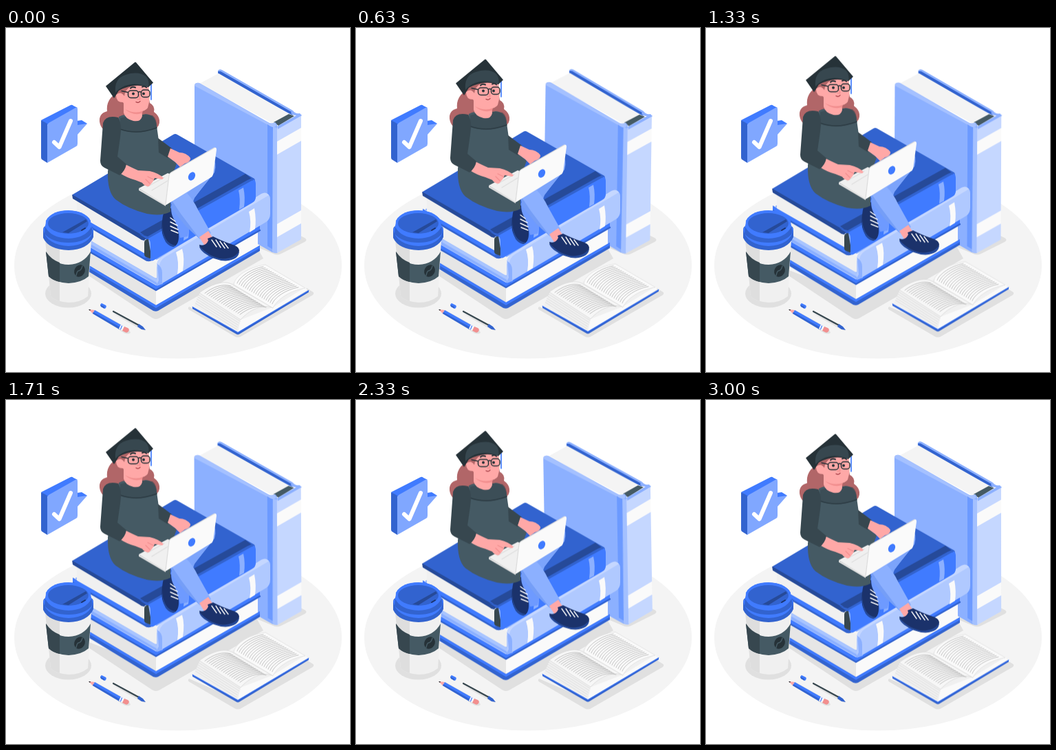
An HTML page for the animation above (3.04 s loop, 500x500 px).

```html
<!DOCTYPE html>
<html lang="en">
<head>
<meta charset="utf-8">
<title>Studying on a stack of books</title>
<style>
  html, body { margin: 0; width: 100%; height: 100%; overflow: hidden; background: #fff; }
  svg { display: block; width: 100vw; height: 100vh; }
  .float, .sway, .drift { animation: 3040ms linear infinite; }
  .float { animation-name: float; }
  .sway { animation-name: sway; transform-origin: 351px 194px; }
  .drift { animation-name: drift; }
  @keyframes float { 50% { transform: translateY(-10px); } }
  @keyframes sway {
    25% { transform: rotate(1deg); }
    75% { transform: rotate(-1deg); }
  }
  @keyframes drift {
    0% { transform: none; }
    16.4% { transform: translateY(-.6px); }
    69% { transform: translateY(-8px); }
    100% { transform: translateY(-3.3px); }
  }
  .blue { fill: #407bff; }
  .mid { fill: #3263cf; }
  .deep { fill: #264a99; }
  .soft { fill: #8cb0ff; }
  .pale { fill: #c5d7ff; }
  .white { fill: #fafafa; }
  .paper { fill: #f0f0f0; }
  .shade { fill: #e0e0e0; }
  .slate { fill: #455a64; }
  .coal { fill: #37474f; }
  .ink { fill: #263238; }
  .skin { fill: #ffa8a7; }
  .hair { fill: #b16668; }
  .navy { fill: #1b326b; }
  .line { fill: none; stroke-linecap: round; stroke-linejoin: round; }
</style>
</head>
<body>
<svg viewBox="0 0 500 500">
  <ellipse cx="250" cy="345" rx="238" ry="135.500" fill="#f4f4f4"/>

  <!-- ground shadows -->
  <g class="shade">
    <path d="M90 340L212 421Q218 425 224 421L374 335L360 310L218 390Z"/>
    <path d="M364 318L388 328Q394 331 400 328L434 311Q439 308 434 305L420 298Z"/>
    <path d="M266 405Q263 408 267 410L332 448Q337 451 342 448L446 388Q449 385 445 383L437 378L337 436Z"/>
    <ellipse cx="90.500" cy="386" rx="33.500" ry="20.500"/>
    <path d="M124 414L168 441Q176 447 181 443L178 437L130 410Z"/>
    <path d="M154 414L196 438L203 440L196 433Z"/>
  </g>

  <!-- standing book -->
  <g class="sway">
    <path class="soft" d="M308 67V62Q310 59 314 61L417 120L414 126L309 70Z"/>
    <path class="mid" d="M308 63L312 63L415 122L417 127L309 69Z"/>
    <path fill="#f4f4f4" d="M281 81L309 66L414 126L392 141Z"/>
    <path class="slate" d="M389 137L411 125L419 128L396 142Z"/>
    <path class="soft" d="M274 84Q274 79 281 80L381 137Q386 140 391 137L394 140L395 327L387 326L366 314L274 261Z"/>
    <path d="M274 84Q275 79 281 80L380 137Q386 141 391 137L393 142L388 145L381 141Z" fill="#a5c1ff"/>
    <path d="M380 140Q385 144 388 144V322L380 317Z" fill="#6c9aff"/>
    <path class="pale" d="M394 146L428 126Q430 125 429 130V306Q429 308 426 309L394 327Z"/>
    <path d="M388 144Q394 144 394 147V327Q390 328 387 325Z" fill="#a3c0ff"/>
    <path class="soft" d="M394 143L422 127Q415 127 414 123L417 120Q420 125 427 124L430 127L395 147Z"/>
    <path class="white" d="M394 165L429 145V164L394 184ZM394 285L429 265V284L394 304Z"/>
  </g>

  <g class="float">
    <!-- bottom book -->
    <path class="blue" d="M97 304L218 374L369 287V295L218 382L97 312Z"/>
    <path d="M100 314L218 382V404L100 336Z" fill="#e6e6e6"/>
    <path class="white" d="M218 382L366 297V318L218 404Z"/>
    <path class="mid" d="M97 331L218 403L369 316V324L221 411Q218 412.500 214 411L97 340Z"/>
    <path class="blue" d="M97 331L218 403L369 316V320L218 407L97 335Z"/>
    <path class="line" d="M97 311L218 381L369 294" stroke="#3263cf" stroke-width="2.500"/>

    <!-- middle book -->
    <path class="soft" d="M100 268L219 337L370 250L250 190Z"/>
    <path class="paper" d="M103 276L222 343V366L103 299Z"/>
    <path class="soft" d="M97 294L216 363Q221 365 222 360L228 372L219 374L97 304Z"/>
    <path d="M97 294L216 363L222 367L219 370L97 299Z" fill="#a9c5ff"/>
    <path d="M219 348Q218 338 226 333L372 241Q383 238 384 248V270Q384 278 378 282L229 370Q219 376 219 374Z" fill="#b0c9ff"/>
    <path class="pale" d="M219 346Q219 337 227 332L371 241Q378 237 382 243L231 333Q223 338 222 350Z"/>
    <path class="soft" d="M220 343Q227 347 227 356V371Q221 375 218 374L222 367Z"/>
    <path class="white" d="M247 326L256 321Q260 334 257 353L249 358Q252 340 247 326ZM353 267L361 262Q364 278 362 292L354 297Q357 281 353 267Z"/>

    <!-- top book -->
    <path class="mid" d="M97 267L103 271L206 331L212 338Q206 341 201 337L97 276Z"/>
    <path class="blue" d="M97 267L204 329L207 333L201 334L97 273Z"/>
    <path class="paper" d="M103 247L203 303V328L103 271Z"/>
    <path class="mid" d="M97 242L243 155Q246 153 249 155L361 219Q363 222 360 225L210 307Q203 309 197 304L97 246Z"/>
    <path class="deep" d="M96 242L196 300Q202 303 208 300L201 309Q197 309 194 306L97 248Z"/>
    <path class="deep" d="M195 297L348 212L357 219L206 305Z"/>
    <path class="coal" d="M201 312Q201 307 207 307L212 336L204 333Q201 332 201 329Z"/>
    <path class="blue" d="M205 305L357 219Q363 220 363 226V246Q363 251 358 254L214 338Q209 340 210 332V314Q210 308 205 305Z"/>
    <path class="mid" d="M194 300L205 307L357 222Q362 221 358 218L351 221L206 303Z"/>
    <path class="soft" d="M338 236L345 232Q348 245 346 260L339 264Q341 248 338 236ZM257 282L264 278Q267 290 265 305L258 309Q260 295 257 282Z"/>

    <!-- legs -->
    <path d="M240 258L260 258L268 284L264 303L253 305Q250 286 238 272Z" fill="#6e9aff"/>
    <path class="soft" d="M236 240L300 186Q307 196 303 210L272 249L266 262Z"/>
    <path d="M262 241L302 209L274 247L270 258Z" fill="#7ca4fb"/>
    <path class="soft" d="M236 244L262 239Q272 249 279 264L298 298Q292 306 282 307L255 277Q244 262 236 244Z"/>
    <path d="M238 246L242 264L262 289L282 307L254 270Z" fill="#759ef7"/>
    <path class="skin" d="M281 304L294 295L303 309L289 317Z"/>

    <!-- shoes -->
    <path class="navy" d="M230 264L240 262Q240 270 243 276Q249 287 251 299Q252 316 243 318Q231 314 227 298Q225 284 230 264Z"/>
    <path class="deep" d="M227 284Q227 296 232 306Q237 315 247 316Q240 321 232 311Q226 299 227 284Z"/>
    <path class="line" d="M239 276L246 281M239 282L249 287M239 288L250 293M240 294L250 298" stroke="#fafafa" stroke-width="1.500"/>
    <path class="navy" d="M281 315Q290 318 294 309L293 306L301 303Q315 310 327 314Q338 317 339 323Q337 337 318 338Q304 337 290 327Q281 321 281 315Z"/>
    <path class="deep" d="M281 317Q297 334 315 335.500Q333 335 339 324Q339 337 319 338.500Q303 338 288 327Q281 321 281 317Z"/>
    <path class="line" d="M299 308L306 318M305 308L312 319M311 310L318 320M317 312L323 320" stroke="#fafafa" stroke-width="1.400"/>

    <!-- hair and body -->
    <path class="hair" d="M162 94Q145 103 147 121Q135 124 136 136Q138 150 151 150L216 147Q224 143 223 134Q222 127 215 122Q217 113 209 109L205 86Z"/>
    <path class="slate" d="M164 129Q174 123 184 129L203 125Q217 126 219 142L223 171L236 187L248 197L239 222L239 267Q226 274 205 270Q177 263 159 249Q147 238 148 208Z"/>
    <path class="coal" d="M166 131Q190 124 213 127Q220 132 219 146L200 151Q177 153 166 146Z" fill-opacity=".6"/>
    <path class="line" d="M166 147Q190 156 219 145" stroke="#2c3b43" stroke-width="1.500"/>
    <path class="coal" d="M221 160L241 175Q241 183 235 189L222 181Z"/>
    <path class="skin" d="M239 175L252 181Q262 181 268 189Q269 194 260 197L253 202L246 195L235 187Z"/>

    <!-- head -->
    <path class="skin" d="M171 108L197 112L198 128Q196 137 185 135Q173 132 171 123Z"/>
    <path d="M173 118Q188 126 199 120L198 124Q184 128 173 118Z" fill="#f28f8f"/>
    <path class="skin" d="M165 91Q178 76 207 84Q211 101 206 116Q201 123 189 121Q175 119 170 108Q160 108 160 98Q160 91 165 91Z"/>
    <path class="hair" d="M160 97Q158 82 178 77Q198 76 208 84Q191 82 180 86Q173 90 172 99Q167 91 160 97Z"/>
    <g transform="translate(0 -1.500)">
      <path class="line" d="M181 89Q184 86 188 88M198 87Q202 85 204 88" stroke="#263238" stroke-width="2"/>
      <path class="line" d="M193 98L195 105L191 105" stroke="#f28f8f" stroke-width="1.300"/>
      <path class="line" d="M189 109Q193 111 195 108" stroke="#a33b44" stroke-width="1.300"/>
      <g class="line" stroke="#263238" stroke-width="1.500">
        <rect x="177.500" y="92.500" width="15" height="10.500" rx="4"/>
        <rect x="196.500" y="91.500" width="12.500" height="10.500" rx="4"/>
        <path d="M192.500 95Q194 93 196.500 95M177 95L168 93"/>
      </g>
      <circle class="ink" cx="185" cy="97" r="2"/>
      <circle class="ink" cx="200" cy="97" r="2"/>
    </g>
    <path class="line" d="M211 80V104" stroke="#407bff" stroke-width="1.700"/>
    <path class="ink" d="M145 84.500L187 50Q188 49 189 50L214 79.500L207 86Q185 79 164 91L157 102Z"/>
    <path class="coal" d="M159 94Q157 73 174 68Q193 62 204 71Q209 77 207 86Q188 78 173 84Q164 88 159 94Z"/>

    <!-- laptop -->
    <path class="shade" d="M193 233L232 256V259L193 236Z"/>
    <path class="paper" d="M193 233L235 211L243 214L232 257Z"/>
    <path class="line" d="M205 231L230 217M212 236L235 222" stroke="#dedede" stroke-width="1.200"/>
    <path class="white" d="M240 210L303 174Q306 173 306 177L301 213Q300 216 298 217L233 257Q231 258 232 253L237 214Q238 211 240 210Z"/>
    <path class="line" d="M232 256L237 214Q238 211 240 210L303 174" stroke="#dcdcdc" stroke-width="1.200"/>
    <ellipse class="blue" cx="270" cy="215.500" rx="4.700" ry="6.500" transform="rotate(28 270 215.500)"/>

    <!-- near arm -->
    <path class="skin" d="M171 197Q183 203 192 207L209 208Q222 211 229 218L227 220L216 218Q215 221 213 224L208 230Q202 231 198 225L188 221Q176 218 164 210Z"/>
    <path class="line" d="M206 216L214 220M203 220L209 226" stroke="#f28f8f" stroke-width="1.200"/>
    <path class="coal" d="M141 138Q145 126 163 130Q169 140 166 159L162 187L175 198Q173 208 165 214L143 203Q137 200 137 193Z"/>
  </g>

  <!-- speech bubble -->
  <path fill="#80a7ff" d="M103 136L118 139L103 156Z"/>
  <path class="blue" d="M103 135L110 134L118 139L104 141Z"/>
  <path class="blue" d="M51 134L94 112Q96 111 98 113L104 116L60 141Z"/>
  <path class="mid" d="M51 134L60 139V196L52 191Q51 190 51 188Z"/>
  <path fill="#80a7ff" d="M60 142Q60 140 62 138L101 116Q104 115 104 118V168Q104 171 102 172L60 196Z"/>
  <path class="line" d="M70 166L77.500 173L94 135" stroke="#fff" stroke-width="6"/>

  <!-- coffee cup -->
  <path class="paper" d="M57 308H124L119 390Q108 399 91 399Q73 398 65 390Z"/>
  <path d="M57 308H78V397Q70 395 65 390Z" fill="#dedede"/>
  <path class="slate" d="M58 325Q69 344 91 344Q113 343 123 325L120 361Q110 370 91 371Q72 370 62 361Z"/>
  <path class="coal" d="M58 325Q65 336 78 341V369Q68 367 62 361Z"/>
  <ellipse class="ink" cx="107" cy="353" rx="7.500" ry="9" transform="rotate(32 107 353)"/>
  <path class="line" d="M111 346Q109 353 105 353Q103 354 102 360" stroke="#455a64" stroke-width="1.500"/>
  <path class="mid" d="M54 294Q54 288 58 288H123Q127 288 127 294V304Q119 322 91 323Q62 322 54 305Z"/>
  <path class="blue" d="M54 293Q58 288 58 280Q67 265 91 265Q115 266 123 280Q123 288 127 293Q123 315 91 317Q59 315 54 293Z"/>
  <path class="mid" d="M57 289Q65 305 91 306Q116 305 124 289Q127 296 124 300Q113 312 91 312Q67 312 56 299Z"/>
  <ellipse class="blue" cx="90.500" cy="283" rx="32.500" ry="17.500"/>
  <ellipse class="mid" cx="90.500" cy="284" rx="29.500" ry="15"/>
  <path class="deep" d="M82 297L116 278L118 281L91 298Z"/>
  <path class="line" d="M110 294L115 291" stroke="#1b326b" stroke-width="2"/>

  <!-- pencil, eraser, pen -->
  <path class="skin" d="M120 409L129 410L126 415Z"/>
  <path class="ink" d="M120 409L123 409L122 411Z"/>
  <path class="blue" d="M129 410L168 432L165 438L126 415Z"/>
  <path class="mid" d="M127 413L166 435L165 438L126 415Z"/>
  <path class="white" d="M167 431L172 434L169 440L164 437Z"/>
  <path class="line" d="M168.500 433L166.500 438" stroke="#407bff" stroke-width="1.200"/>
  <path d="M172 434L177 436Q180 438 178 441Q176 444 173 442L169 440Z" fill="#f28f8f"/>
  <path class="blue" d="M139 400L145 403Q147 405 144 408L138 405Q136 402 139 400Z"/>
  <path class="mid" d="M137 402L143 405L143 408L138 405Z"/>
  <path class="line" d="M156 412L193 432" stroke="#37474f" stroke-width="2.200"/>
  <path class="mid" d="M193 430L199 434L203 439L197 438L191 434Z"/>

  <!-- open book -->
  <g class="drift">
    <path class="mid" d="M271 405L337 442L440 381V384L339 445Q337 446 335 445L271 408Z"/>
    <path class="paper" d="M273 405L282 384L331 370L377 344L438 380L337 442Z"/>
    <path class="white" d="M337 442L341 424L388 406L435 377L438 381Z"/>
    <path class="line" d="M271 405.500L337 442.500L440 381.500" stroke="#407bff" stroke-width="1"/>
    <g id="edges" class="line" stroke="#dcdcdc" stroke-width=".8"></g>
    <path fill="#f7f7f7" stroke="#dadada" stroke-width=".8" d="M281 385C295 374 318 364 331 374L388 407C374 400 353 410 341 424Z"/>
    <path fill="#fafafa" stroke="#e0e0e0" stroke-width=".8" d="M331 373C332 362 350 348 377 344L435 378C413 382 395 393 388 407Z"/>
    <g id="text" class="line" stroke="#b9b9b9" stroke-width=".9"></g>
  </g>
</svg>
<script>
  // Repeats one stroke n times, shifted by (dx, dy) each time.
  function hatch(id, curve, n, dx, dy) {
    let marks = "";
    for (let i = 0; i < n; i++) {
      marks += `<path d="${curve}" transform="translate(${i * dx} ${i * dy})"/>`;
    }
    document.getElementById(id).innerHTML += marks;
  }
  hatch("text", "M289 385.500C300 377 314 371 327 375", 18, 3, 1.82);
  hatch("text", "M336 371C339 362 356 350 374 347", 18, 3, 1.76);
  hatch("edges", "M280 388L340 426", 5, -1.2, 3);
</script>
</body>
</html>
```
